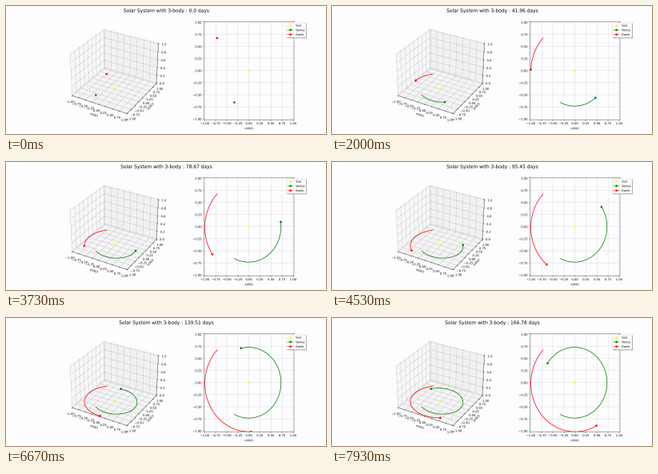
Recreate the animation shown at these times as a matplotlib script. Size 400 by 160 pixels, loop 8000 ms.

```python
import numpy as np
import matplotlib.pyplot as plt
from matplotlib.animation import FuncAnimation
from matplotlib.patheffects import Normal

FRAMES = 120
INTERVAL = 66.58     # ms
DAY_STEP = 1.04893   # simulated days per step
LIMIT = 1.02
PAPER = "#fdfcff"

plt.rcParams.update({
    "font.family": "DejaVu Sans",
    "figure.facecolor": PAPER,
    "axes.facecolor": PAPER,
    "text.hinting": "none",
    # smooth sub-pixel text and lines at this low resolution
    "path.snap": False,
    "path.effects": [Normal()],
})


def earth(day):
    """Heliocentric position of the Earth in AU."""
    start, peri, ecc = np.radians([136.8, 102.9, 0.957])
    m0 = np.radians(33)
    m = m0 + np.radians(0.98) * day
    angle = start + (m - m0) + 2 * ecc * (np.sin(m) - np.sin(m0))
    r = 1.0 - ecc * np.cos(angle - peri)
    return r * np.cos(angle), r * np.sin(angle), 0 * day


def venus(day):
    """Heliocentric position of Venus in AU, on its tilted orbit."""
    angle = np.radians(243.3 + 1.582 * day)
    node, tilt = np.radians([76.7, 3.39])
    r = 0.733 * (1 - 0.009 * np.cos(angle - np.radians(10)))
    z = r * np.sin(tilt) * np.sin(angle - node)
    return r * np.cos(angle), r * np.sin(angle), z


def sun(day):
    return 0 * day, 0 * day, 0 * day


fig = plt.figure(figsize=(15, 6), dpi=400 / 15)
grid = fig.add_gridspec(1, 2, width_ratios=[1.5, 1])
space = fig.add_subplot(grid[0], projection="3d")
plane = fig.add_subplot(grid[1])
title = fig.suptitle("", fontsize=16)

for ax in (space, plane):
    ax.set_xlim(-LIMIT, LIMIT)
    ax.set_ylim(-LIMIT, LIMIT)
space.set_zlim(-1 / 48, 1 + 1 / 48)
space.set_xlabel("x(AU)")
space.set_ylabel("y(AU)")
plane.set_xlabel("x(AU)", labelpad=6)
plane.grid(linestyle="--")

bodies = []
for name, color, orbit in (("Sun", "yellow", sun),
                           ("Venus", "green", venus),
                           ("Earth", "red", earth)):
    trail, = plane.plot([], [], color=color, lw=2)
    head, = plane.plot([], [], "o-", color=color, label=name)
    trail3, = space.plot([], [], [], color=color, lw=2)
    head3, = space.plot([], [], [], "o", color=color)
    bodies.append((orbit, trail, head, trail3, head3))

plane.legend(loc="upper right", bbox_to_anchor=(1.15, 1.0), shadow=True)


def update(frame):
    step = round(frame * 4 / 3)
    days = np.arange(step + 1) * DAY_STEP
    title.set_text(f"Solar System with 3-body : {round(step * DAY_STEP, 2)} days")
    for orbit, trail, head, trail3, head3 in bodies:
        x, y, z = orbit(days)
        trail.set_data(x, y)
        head.set_data(x[-1:], y[-1:])
        trail3.set_data_3d(x, y, z)
        head3.set_data_3d(x[-1:], y[-1:], z[-1:])
    return []


anim = FuncAnimation(fig, update, frames=FRAMES, interval=INTERVAL,
                     init_func=lambda: update(0), repeat=True, repeat_delay=0)
plt.show()
```
